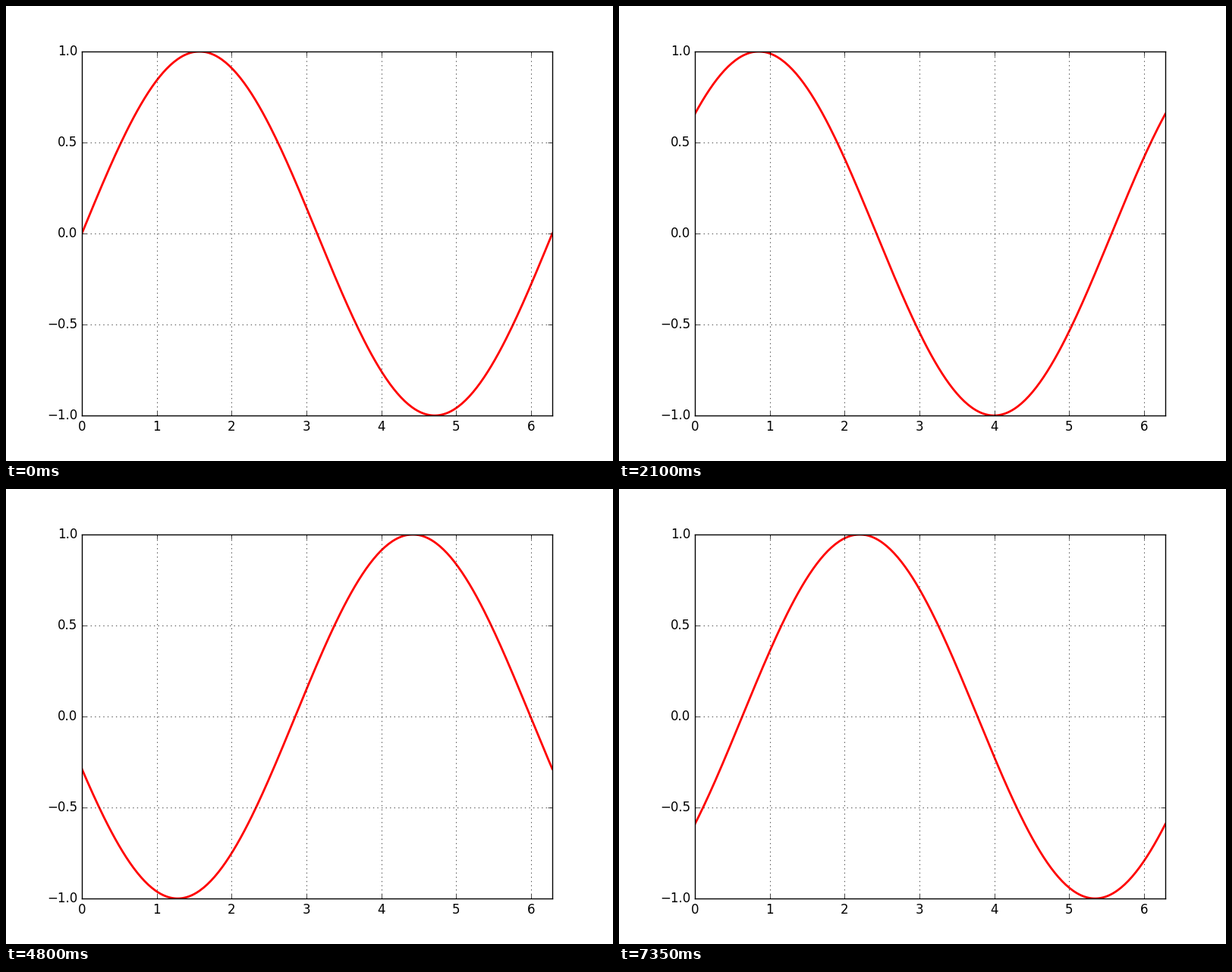
Animation, 800 px wide and 600 px high, one loop 7.5 s. Source, as a matplotlib script:

```python
import numpy as np
import matplotlib.pyplot as plt
from matplotlib.animation import FuncAnimation

FRAMES = 50
INTERVAL = 150
PHASE_STEP = 0.5

plt.style.use("classic")
plt.rcParams["font.family"] = "DejaVu Sans"

fig, ax = plt.subplots(figsize=(8, 6), dpi=100, facecolor="white")
fig.subplots_adjust(left=0.125, right=0.9, bottom=0.1, top=0.9)

x = np.linspace(0, 2 * np.pi, 256)
line, = ax.plot(x, np.sin(x), color="red", lw=2)

ax.set_xticks(range(7))
ax.set_yticks(np.linspace(-1, 1, 5))
ax.set_xlim(0, 2 * np.pi)
ax.set_ylim(-1, 1)
ax.grid(True)


def update(i):
    line.set_ydata(np.sin(x + PHASE_STEP * i))
    return line,


anim = FuncAnimation(fig, update, frames=FRAMES, interval=INTERVAL,
                     repeat=True, repeat_delay=0)

plt.show()
```
